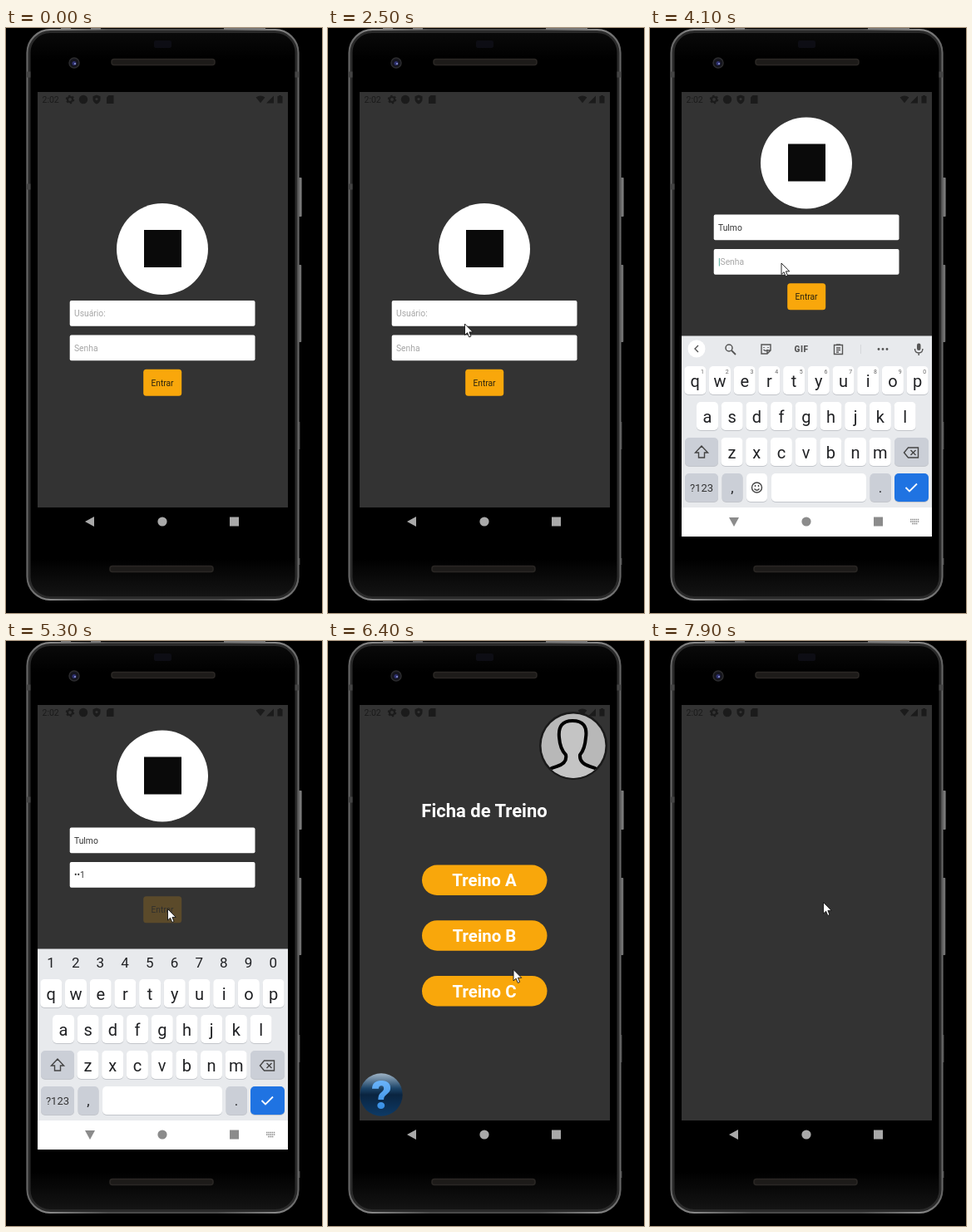
An HTML page that plays this animation: 380x704 px, repeating every 8000 ms.

```html
<!DOCTYPE html>
<html lang="pt">
<head>
<meta charset="utf-8">
<style>
  html, body { margin: 0; width: 100%; height: 100%; overflow: hidden; background: #000; }
  svg { display: block; width: 380px; height: 704px; font-family: Roboto, sans-serif; }
</style>
</head>
<body>
<svg viewBox="0 0 380 704">
  <defs>
    <linearGradient id="rim" x2="1">
      <stop offset="0" stop-color="#666"/><stop offset=".08" stop-color="#8a8a8a"/>
      <stop offset=".3" stop-color="#4a4a4a"/><stop offset=".7" stop-color="#4a4a4a"/>
      <stop offset=".92" stop-color="#8a8a8a"/><stop offset="1" stop-color="#666"/>
    </linearGradient>
    <linearGradient id="body" x2="0" y2="1">
      <stop offset="0" stop-color="#0a0a0a"/><stop offset=".05" stop-color="#000"/>
      <stop offset=".93" stop-color="#000"/><stop offset="1" stop-color="#151515"/>
    </linearGradient>
    <linearGradient id="side"><stop offset="0" stop-color="#222"/><stop offset=".6" stop-color="#888"/><stop offset="1" stop-color="#444"/></linearGradient>
    <linearGradient id="globe" x2="0" y2="1">
      <stop offset="0" stop-color="#9fb4c6"/><stop offset=".35" stop-color="#1c4468"/>
      <stop offset=".5" stop-color="#0a2440"/><stop offset="1" stop-color="#0d3a66"/>
    </linearGradient>
    <linearGradient id="mark" x2="0" y2="1"><stop offset="0" stop-color="#7cc0ff"/><stop offset="1" stop-color="#2380dd"/></linearGradient>
    <clipPath id="screen"><rect x="38" y="77" width="301" height="535"/></clipPath>
    <clipPath id="portrait"><circle cx="295" cy="126" r="39"/></clipPath>
  </defs>

  <g fill="url(#side)">
    <rect x="350" y="180" width="6" height="47" rx="1"/><rect x="350" y="285" width="5.5" height="93" rx="1"/>
    <rect x="350" y="474" width="3.5" height="33"/><rect x="350" y="638" width="3.5" height="8"/>
  </g>
  <rect x="27" y="3.500" width="323" height="683" rx="26" fill="url(#body)" stroke="#2a2a2a" stroke-width="5"/>
  <rect x="25.500" y="2" width="326" height="686" rx="28" fill="none" stroke="url(#rim)" stroke-width="2"/>
  <path d="M24.500 56h5M24.500 191h5M347.500 56h5" stroke="#444" stroke-width="7"/>
  <path d="M66 1h12M102 1h12M262 1h50" stroke="#777" stroke-width="2"/>
  <rect x="178" y="15" width="21" height="9" rx="2" fill="#0d0d14"/>
  <g fill="#1d1b19" stroke="#2a2724" stroke-width="1.500">
    <rect x="127" y="37.500" width="124" height="7" rx="3"/><rect x="125" y="647.500" width="124" height="7" rx="3"/>
  </g>
  <circle cx="82" cy="42" r="6" fill="#15151d" stroke="#2c2c2e" stroke-width="1.5"/>
  <circle cx="82" cy="42.5" r="2.5" fill="#2e3170"/><circle cx="83" cy="43" r="1" fill="#9aa0dd"/>
  <g id="scene" clip-path="url(#screen)"></g>
  <path id="pointer" d="M0 0V13.500L3.100 10.700 5.300 16 7.500 15 5.400 9.900H9.700Z" fill="#fff" stroke="#111" stroke-width=".9"/>
</svg>

<script>
const LOOP = 8000, STEP = 100;
const USER = 'Tulmo', ORANGE = '#f9a70b';
const scene = document.getElementById('scene');
const pointer = document.getElementById('pointer');

const clamp = v => Math.max(0, Math.min(1, v));
const progress = (t, start, length) => clamp((t - start) / length);
const smooth = p => p * p * (3 - 2 * p);
const rect = (x, y, w, h, fill, r = 0) => `<rect x="${x}" y="${y}" width="${w}" height="${h}" rx="${r}" fill="${fill}"/>`;
const circle = (x, y, r, fill) => `<circle cx="${x}" cy="${y}" r="${r}" fill="${fill}"/>`;
const text = (x, y, size, fill, s, extra = '') => `<text x="${x}" y="${y}" font-size="${size}" fill="${fill}" ${extra}>${s}</text>`;
const label = (x, y, size, fill, s, extra = '') => text(x, y, size, fill, s, 'text-anchor="middle" ' + extra);
const line = (d, color = '#555', width = 1.4) => `<path d="${d}" fill="none" stroke="${color}" stroke-width="${width}"/>`;
const shape = (d, fill) => `<path d="${d}" fill="${fill}"/>`;
const group = (attrs, ...parts) => `<g ${attrs}>${parts.join('')}</g>`;

// time, x, y of the pointer's tip
const route = [
  [2000, 231, 636], [2400, 164.5, 356], [2900, 164.5, 356], [3200, 161, 339.5], [3800, 161, 339.5],
  [4100, 158, 283], [4600, 158, 283], [5000, 194.5, 322.5], [5900, 194.5, 322.5], [6100, 226, 288],
  [6300, 226, 348], [6450, 222, 412], [6800, 62, 546], [6950, 62, 546], [7400, 280.5, 159],
  [7600, 280.5, 159], [7900, 208.5, 314.5], [8000, 208.5, 314.5]
];
function pointerAt(t) {
  const i = route.findIndex(p => p[0] > t);
  const [t0, x0, y0] = route[i - 1], [t1, x1, y1] = route[i];
  const p = smooth((t - t0) / (t1 - t0));
  return [x0 + (x1 - x0) * p, y0 + (y1 - y0) * p];
}

function statusBar() {
  const c = '#1b1b1b';
  return text(43.5, 90, 10.5, c, '2:02') +
    `<circle cx="77" cy="86" r="3" fill="none" stroke="${c}" stroke-width="2.2"/>` +
    `<circle cx="77" cy="86" r="4.6" fill="none" stroke="${c}" stroke-width="1.3" stroke-dasharray="2.4"/>` +
    circle(93, 86, 5.2, c) +
    shape('M109 80.500l4.500 1.700v3.500q0 3.800-4.500 5.800q-4.500-2-4.500-5.800v-3.500Z', c) + circle(109, 85.5, 1.6, '#333') +
    shape('M121 83.500l2.500-2.500h6v10h-8.500Z', c) +
    shape('M300.500 83.500q5.500-4 11 0l-5.500 6.700ZM313 90.500l9-9v9ZM326.500 82h1.500v-1h3v1h1.500v8.500h-6Z', c);
}

function field(y, value, hint, caret) {
  const bar = caret ? '<tspan fill="#1f8f7a">|</tspan>' : '';
  return rect(76.7, y, 222.8, 30.8, '#fff', 2) +
    text(82, y + 19.3, 10.3, value ? '#333' : '#a6a6a6', value ? value + bar : bar + hint);
}

function login(t) {
  const lift = -103.5 * smooth(progress(t, 2850, 200));
  const user = t < 3200 ? '' : USER.slice(0, 1 + (t - 3200) / 100);
  const count = t < 4600 ? 0 : Math.min(3, 1 + Math.floor((t - 4600) / 200));
  const secret = count ? '•'.repeat(count - 1) + '1' : '';
  const blink = (t + 200) % 1000 < 500;
  const press = t >= 5200 ? (t >= 5300 ? .2 : .6) : 1;
  return rect(38, 77, 301, 500, '#333') +
    group(`transform="translate(0 ${lift})"`,
      circle(188, 266, 55, '#fff'), rect(166, 243, 45, 45, '#0a0a0a'),
      field(328, user, 'Usuário:', blink && t >= 2800 && t < 4100),
      field(369.5, secret, 'Senha', blink && t >= 4100),
      group(`opacity="${press}"`, rect(165.2, 410.7, 46, 32, ORANGE, 3.5), label(188, 430.8, 10.2, '#2b2410', 'Entrar'))) +
    statusBar();
}

function toolbar() {
  return circle(56, 386, 10.5, '#fff') + line('M58 382l-4 4 4 4') +
    '<circle cx="95" cy="385" r="4" fill="none" stroke="#555" stroke-width="1.5"/>' + line('M98 388l5 5', '#555', 1.8) +
    line('M134 381h11v7l-4 4h-7ZM145 388h-4v4M137 384v1M142 384v1M136.500 387q3 3 5 0') +
    label(182, 390, 10, '#555', 'GIF', 'font-weight="900" letter-spacing=".5"') +
    line('M221.500 381.500h10v11h-10ZM224 381h5M224 385h5M224 387.500h5M224 390h3') + line('M253.500 381v11', '#d5d7da', 1) +
    [275, 280, 285].map(x => circle(x, 386.5, 1.4, '#555')).join('') +
    rect(321, 379.5, 4.5, 8.5, '#555', 2.2) + line('M318.500 386q0 5 4.700 5q4.700 0 4.700-5M323.200 391v3');
}

function keyboard(secret, upper) {
  const ink = '#202124', gray = '#cbcfd7';
  const key = (x, y, w, fill = '#fff') => rect(x, y + 1, w, 34, '#c3c6cb', 5) + rect(x, y, w, 34, fill, 5);
  const row = (letters, x, y) => [...letters].map((c, i) => {
    const cx = x + i * 29.7;
    return key(cx - 13, y, 26) + label(cx, y + 24.5, 20, ink, upper ? c.toUpperCase() : c);
  }).join('');
  const digits = (x, y, size) => [...'1234567890'].map((d, i) => label(x + i * 29.7, y, size, secret ? ink : '#666', d)).join('');
  return rect(38, 370.5, 301, 207, '#e8eaed') +
    (secret ? digits(54, 393, 17) : toolbar()) +
    row('qwertyuiop', 54.3, 407) + (secret ? '' : digits(63, 415.5, 7)) +
    row('asdfghjkl', 69, 450) +
    key(42, 493, 40, gray) + row('zxcvbnm', 98.5, 493) + key(294, 493, 41, gray) +
    `<path d="M62 503l-7.500 8h4v6h7v-6h4Z" fill="${upper ? '#444' : 'none'}" stroke="#444" stroke-width="1.4"/>` +
    line('M305.500 511l5-6h12v12h-12ZM313.500 508l6 6M319.500 508l-6 6', '#444') +
    key(42, 536, 40, gray) + label(62, 558, 13, '#333', '?123') +
    key(86.5, 536, 25, gray) + label(99, 559, 17, ink, ',') +
    (secret ? key(116, 536, 144) :
      key(116, 536, 25) + key(146, 536, 114) +
      '<circle cx="128.500" cy="553" r="6" fill="none" stroke="#444" stroke-width="1.4"/>' +
      line('M126.500 550v2M130.500 550v2M125.500 554.500q3 3.500 6 0', '#444')) +
    key(264.5, 536, 25.5, gray) + label(277, 559, 17, ink, '.') +
    key(294, 536, 41, '#1f73e2') + line('M307.500 553l4.500 4.500 9-9', '#fff', 1.8);
}

function navBar(t, light) {
  const c = light ? '#8b8b8b' : '#a9a9a9';
  const turn = light ? 270 * progress(t, 3100, 400) : 0;
  return rect(38, 577, 301, 35, light ? '#fff' : '#000') +
    group(`transform="rotate(${turn} 101 594)"`, shape('M95 594l11-6v12Z', c)) +
    circle(188, 594, 5.6, c) + rect(269, 588.5, 11, 11, c) +
    (light ? group('stroke-dasharray="1.5 .7"', line('M313 591.500h11M313 594h11M315 596.500h7', c)) : '');
}

function avatar() {
  return circle(295, 126, 41, '#1a1a1a') + circle(295, 126, 38.5, '#b8b8b8') +
    group('clip-path="url(#portrait)"',
      `<path d="M256 172Q258 155 275 151Q288 147 286 137Q279 130 278 116Q276 96 294 96Q313 96 310 116Q309 130 303 137Q302 147 315 151Q332 155 334 172Z"
        fill="#c4c4c4" stroke="#000" stroke-width="4"/>`);
}

function menu(t) {
  const fade = progress(t, 5420, 300);
  const press = t >= 7400 && t < 7700 ? .28 : 1;
  return rect(38, 77, 301, 500, '#333') + statusBar() +
    group(`opacity="${fade * press}"`, avatar()) +
    label(188, 212, 22, '#fff', 'Ficha de Treino', 'font-weight="700"') +
    ['A', 'B', 'C'].map((c, i) => {
      const y = 269.5 + i * 66.7;
      return rect(113, y, 150.5, 36.5, ORANGE, 18.2) + label(188, y + 25.7, 20.4, '#fff', 'Treino ' + c, 'font-weight="700"');
    }).join('') +
    group(`opacity="${fade}"`, circle(64, 546, 25.7, 'url(#globe)'),
      label(64.5, 563, 48, 'url(#mark)', '?', 'font-weight="900"'));
}

// A new page grows from the centre over white
function enter(t, start, page) {
  const scale = 1 - .25 * (1 - progress(t, start, 250)) ** 3;
  return rect(38, 77, 301, 535, '#f2f2f2') +
    group(`transform="translate(188.5 344) scale(${scale}) translate(-188.5 -344)"`, page);
}

function render(t) {
  const typing = t >= 2900 && t < 5500;
  let view;
  if (t < 5500) view = login(t);
  else if (t < 7700) view = enter(t, 5450, menu(t));
  else view = enter(t, 7650, rect(38, 77, 301, 500, '#333') + statusBar());
  if (typing) {
    const drop = 206 * (1 - smooth(progress(t, 2800, 250)));
    view += group(`transform="translate(0 ${drop})"`, keyboard(t >= 4300, t < 3300));
  }
  scene.innerHTML = view + navBar(t, typing);

  const shown = t >= route[0][0];
  pointer.style.display = shown ? '' : 'none';
  if (shown) pointer.setAttribute('transform', `translate(${pointerAt(t)})`);
}

let last = -1;
function tick() {
  const t = Math.floor(performance.now() % LOOP / STEP) * STEP;
  if (t !== last) render(last = t);
  requestAnimationFrame(tick);
}
tick();
</script>
</body>
</html>
```
